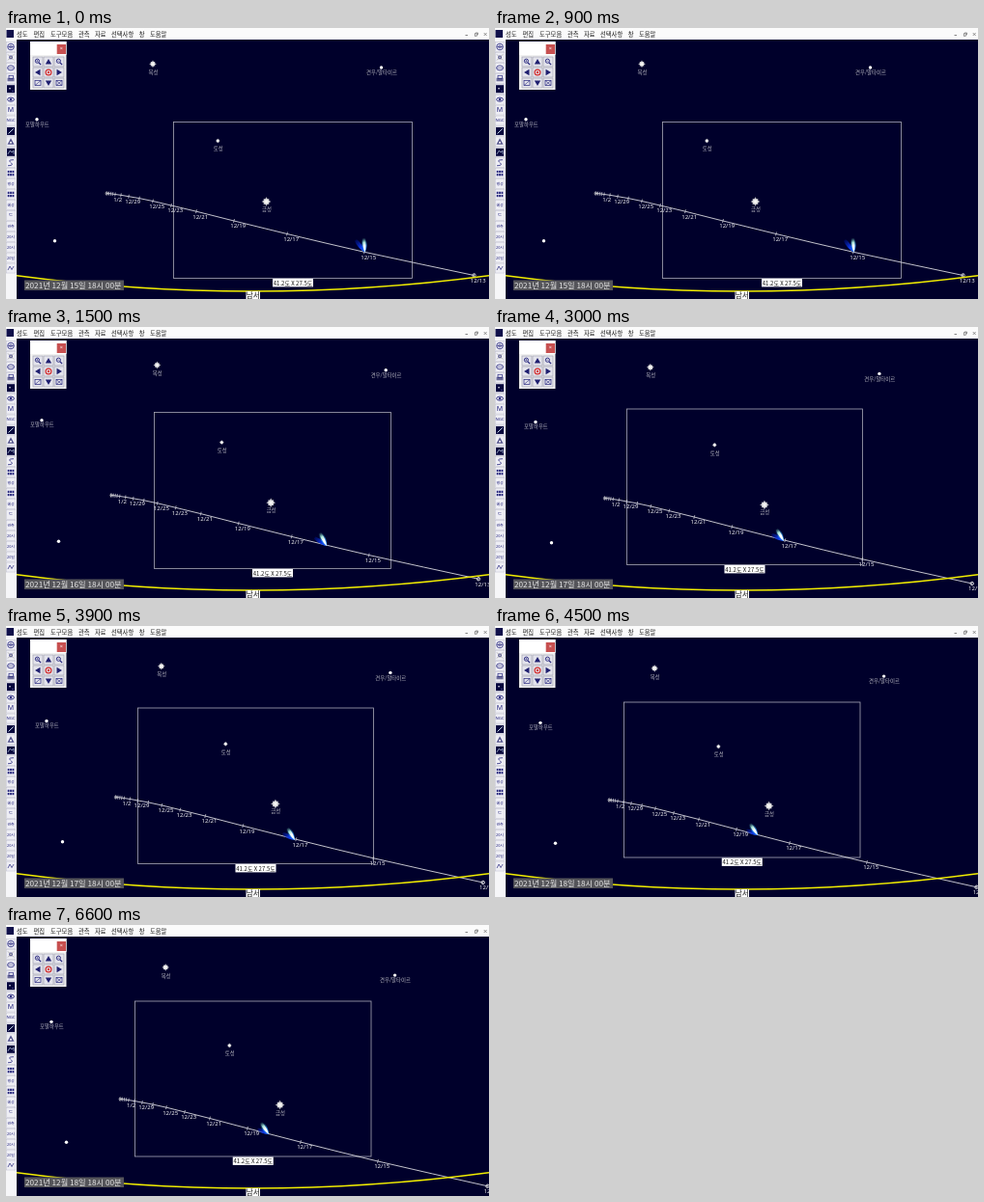
Write an HTML page with a canvas that moves like this. It is 500 by 281 pixels and loops after 8 s.

```html
<!DOCTYPE html>
<html lang="ko">
<head>
<meta charset="utf-8">
<title>Comet path</title>
<style>
html, body { margin: 0; width: 100%; height: 100%; overflow: hidden; background: #00002b; }
canvas { display: block; width: 500px; height: 281px; }
</style>
</head>
<body>
<canvas id="sky"></canvas>
<script>
const W = 500, H = 281, LOOP = 8000;
const cv = document.getElementById('sky');
const c = cv.getContext('2d');
const dpr = window.devicePixelRatio || 1;
cv.width = W * dpr;
cv.height = H * dpr;
c.scale(dpr, dpr);

const KR = '"Noto Sans CJK KR", "Noto Sans CJK", sans-serif';
const LATIN = '"Noto Sans", sans-serif';
const INK = '#24247c';

// One entry per day: frame corner, comet head, its two tail ends
const days = [
  { box: [173, 97, 247, 162], head: [371.5, 232.5], dust: [370.5, 218], ion: [362, 220] },
  { box: [153, 88, 245, 162], head: [332, 227], dust: [325, 213.5], ion: [319.5, 218.5] },
  { box: [136, 84.5, 244, 161.5], head: [299, 222], dust: [291.5, 209.5], ion: [286.5, 215] },
  { box: [133, 78.5, 244.5, 161], head: [272, 217], dust: [264, 205], ion: [260.5, 211.5] }
];

// Name, position on the first day, step per day, size, label drop
const stars = [
  { name: '목성', x: 152, y: 37.3, dx: 4.4, dy: 2.2, r: 4, drop: 8.6 },
  { name: '토성', x: 219.3, y: 117, dx: 4, dy: 2.65, r: 2.6, drop: 8.4 },
  { name: '금성', x: 269.5, y: 180, dx: 4.7, dy: 2.2, r: 5, drop: 8 },
  { name: '견우/알타이르', x: 388.5, y: 41, dx: 4.7, dy: 3.7, drop: 5.2 },
  { name: '포말하우트', x: 32, y: 94.8, dx: 5, dy: 1.85, drop: 4.7 },
  { name: '', x: 50.5, y: 220.7, dx: 4, dy: 1.5 }
];

const path = [
  [104, 171.5], [106.5, 171.6], [108.5, 171.8], [110.5, 172.1],
  [113, 172.5, '1/2'], [119, 173.3], [127, 174.7, '12/29'], [138, 176.6],
  [152, 179.5, '12/25'], [171, 184, '12/23'], [197, 190.2, '12/21'],
  [236, 200, '12/19'], [291, 213.5, '12/17'], [371, 232.3, '12/15'],
  [484.5, 256.5, '12/13']
];

function rect(x, y, w, h, fill) {
  c.fillStyle = fill;
  c.fillRect(x, y, w, h);
}

function frame(x, y, w, h, color, lw = 0.7) {
  c.strokeStyle = color;
  c.lineWidth = lw;
  c.strokeRect(x, y, w, h);
}

function text(s, x, y, size, color, font = KR, align = 'center') {
  c.font = size + 'px ' + font;
  c.textAlign = align;
  c.textBaseline = 'middle';
  c.fillStyle = color;
  c.fillText(s, x, y);
}

function dot(x, y, r, color) {
  c.fillStyle = color;
  c.beginPath();
  c.arc(x, y, r, 0, 7);
  c.fill();
}

function ring(x, y, r, color, lw = 0.8, squash = 1) {
  c.strokeStyle = color;
  c.lineWidth = lw;
  c.beginPath();
  c.ellipse(x, y, r, r * squash, 0, 0, 7);
  c.stroke();
}

function line(pts, color, lw = 0.8) {
  c.strokeStyle = color;
  c.lineWidth = lw;
  c.beginPath();
  pts.forEach(([x, y]) => c.lineTo(x, y));
  c.stroke();
}

function poly(pts, fill) {
  c.fillStyle = fill;
  c.beginPath();
  pts.forEach(([x, y]) => c.lineTo(x, y));
  c.fill();
}

function planet(x, y, r) {
  const g = c.createRadialGradient(x, y, 0, x, y, r);
  g.addColorStop(0, '#fff');
  g.addColorStop(0.45, '#e4e4e4');
  g.addColorStop(1, '#777788');
  c.fillStyle = g;
  c.beginPath();
  for (let i = 0; i < 16; i++) {
    const a = i * Math.PI / 8;
    const k = r * (i % 4 === 0 ? 1 : i % 2 === 0 ? 0.82 : 0.6);
    c.lineTo(x + k * Math.cos(a), y + k * Math.sin(a));
  }
  c.fill();
}

function drawStars(day) {
  for (const s of stars) {
    const x = s.x + s.dx * day, y = s.y + s.dy * day;
    if (s.r) planet(x, y, s.r);
    else dot(x, y, 1.7, '#fff');
    if (s.name) text(s.name, x + 0.4, y + s.drop, 5.4, '#b4b4be');
  }
}

function drawPath(day) {
  const pts = path.map(([x, y, label]) =>
    [x + 4.65 * day, y + day * (3 + (x - 104) / 380 * 1.75), label]);
  const at = i => pts[Math.max(0, Math.min(pts.length - 1, i))];
  c.strokeStyle = '#d8d8de';
  c.lineWidth = 0.9;
  c.beginPath();
  c.moveTo(pts[0][0], pts[0][1]);
  for (let i = 0; i < pts.length - 1; i++) {
    const [p, a, b, n] = [at(i - 1), at(i), at(i + 1), at(i + 2)];
    const k = (b[0] - a[0]) / 3;
    const m = (q, r) => (r[1] - q[1]) / (r[0] - q[0]);
    c.bezierCurveTo(a[0] + k, a[1] + k * m(p, b), b[0] - k, b[1] - k * m(a, n), b[0], b[1]);
  }
  c.stroke();
  pts.forEach(([x, y, label], i) => {
    const p = at(i - 1), n = at(i + 1);
    const a = Math.atan2(n[1] - p[1], n[0] - p[0]) + Math.PI / 2;
    const u = 2 * Math.cos(a), v = 2 * Math.sin(a);
    line([[x - u, y - v], [x + u, y + v]], '#d8d8de', 0.7);
    if (label) text(label, x + (label === '1/2' ? 2.7 : 4.2), y + 5.7, 6, '#f0f0f0', LATIN);
  });
  ring(pts[0][0] + 0.5, pts[0][1], 1.4, '#ccc', 0.7);
  const end = at(pts.length - 1);
  ring(end[0], end[1], 1.7, '#ddd', 0.9);
}

function tail(head, tip, w, stops) {
  const dx = tip[0] - head[0], dy = tip[1] - head[1], n = Math.hypot(dx, dy);
  const g = c.createLinearGradient(head[0], head[1], tip[0], tip[1]);
  stops.forEach(([at, color]) => g.addColorStop(at, color));
  c.save();
  c.translate(head[0], head[1]);
  c.transform(dx / n, dy / n, -dy / n, dx / n, 0, 0);
  c.beginPath();
  c.moveTo(0, 0);
  c.bezierCurveTo(n * 0.3, -w, n * 0.8, -w, n, -w * 0.5);
  c.lineTo(n, w * 0.5);
  c.bezierCurveTo(n * 0.8, w, n * 0.3, w, 0, 0);
  c.restore();
  c.fillStyle = g;
  c.fill();
}

function drawComet(d) {
  tail(d.head, d.ion, 2.4, [[0, '#2a6cff'], [0.45, '#0a35e0'], [1, 'rgba(0,20,150,.35)']]);
  tail(d.head, d.dust, 3.2, [[0, '#2c86ff'], [0.5, 'rgba(40,140,230,.8)'], [1, 'rgba(20,70,90,.1)']]);
  tail(d.head, d.dust, 1.9, [[0, '#eaffff'], [0.45, '#ffffff'], [0.7, '#a8e4d8'], [1, 'rgba(90,150,130,.1)']]);
}

function drawBox([x, y, w, h]) {
  frame(x + 0.5, y + 0.5, w, h, '#a9a9b6', 0.8);
  const mx = x + w / 2 + 0.5, ty = y + h + 1;
  rect(mx - 21, ty, 42, 8.4, '#fff');
  text('41.2도 X 27.5도', mx, ty + 4.4, 6, '#111');
}

function drawHorizon(day) {
  c.strokeStyle = '#f2ee00';
  c.lineWidth = 1.5;
  c.beginPath();
  c.moveTo(11, 256.8);
  c.quadraticCurveTo(255.5, 289.2, 500, 256.8);
  c.stroke();
  rect(248.5, 273, 14.5, 8, '#fff');
  text('남서', 255.7, 277.2, 7.6, '#111');
  rect(19, 261.5, 103, 10.5, '#55555a');
  text(`2021년 12월 ${15 + day}일 18시 00분`, 20, 267, 8.2, '#e8e8e8', KR, 'left');
}

function drawMenu() {
  rect(0, 0, W, 12, '#fbfbfb');
  rect(0.5, 2, 7.5, 8, '#10104a');
  const items = [['성도', 11], ['편집', 28.5], ['도구모음', 46], ['관측', 75],
    ['자료', 92], ['선택사항', 109], ['창', 137.7], ['도움말', 149]];
  items.forEach(([s, x]) => text(s, x, 6.2, 6.3, '#1c1c1c', KR, 'left'));
  line([[475.5, 7.5], [478, 7.5]], '#555', 0.7);
  frame(485.3, 5.8, 2.4, 2.4, '#555', 0.6);
  line([[486.2, 5], [488.5, 5], [488.5, 7.2]], '#555', 0.6);
  line([[494.7, 5], [497.7, 8]], '#555', 0.6);
  line([[497.7, 5], [494.7, 8]], '#555', 0.6);
}

function grid(x, y) {
  for (let j = 0; j < 2; j++) {
    for (let i = 0; i < 3; i++) rect(x - 3.3 + i * 2.4, y - 2.8 + j * 3.2, 1.8, 2.3, INK);
  }
}

const word = s => (x, y) => text(s, x, y, 3.9, INK);
function darkIcon(x, y) {
  rect(x - 4, y - 4, 8, 8, '#05053c');
}

const icons = [
  (x, y) => { ring(x, y, 3.3, INK); ring(x, y, 1.4, INK, 0.6); line([[x - 3, y], [x + 3, y]], INK, 0.6); },
  (x, y) => { ring(x, y, 1.5, INK); line([[x - 3, y - 3], [x + 3, y + 3]], '#777', 0.6); line([[x - 3, y + 3], [x + 3, y - 3]], '#777', 0.6); },
  (x, y) => { ring(x, y, 3.5, INK, 0.8, 0.7); line([[x - 3, y], [x + 3, y]], INK, 0.5); },
  (x, y) => { rect(x - 3.5, y - 0.5, 7, 3.5, '#6b6b99'); frame(x - 2, y - 3, 4.5, 3, INK); },
  (x, y) => { darkIcon(x, y); dot(x - 1, y - 0.5, 0.8, '#fff'); dot(x + 2, y + 2, 0.5, '#aaf'); },
  (x, y) => { ring(x, y, 3.4, INK, 0.9, 0.6); dot(x, y, 1.2, INK); },
  (x, y) => text('M', x, y + 0.2, 7, INK, 'bold ' && LATIN),
  (x, y) => text('NGC', x, y + 0.2, 4.3, INK, LATIN),
  (x, y) => { darkIcon(x, y); line([[x - 2.5, y + 2.5], [x + 2.8, y - 2.5]], '#cde', 1); },
  (x, y) => { poly([[x - 3.5, y + 3], [x, y - 3.5], [x + 3.5, y + 3]], '#54548c'); dot(x, y + 0.8, 1, '#fff'); },
  (x, y) => { darkIcon(x, y); line([[x - 3, y + 2], [x - 1, y - 1.5], [x + 1, y], [x + 3, y - 1.5], [x + 3, y + 2]], '#cde', 0.7); },
  (x, y) => {
    c.strokeStyle = INK;
    c.lineWidth = 0.8;
    c.beginPath();
    c.moveTo(x + 3, y - 3);
    c.bezierCurveTo(x - 9, y - 3, x + 9, y + 2.5, x - 3, y + 3);
    c.stroke();
  },
  grid, word('행성'), grid, word('혜성'),
  (x, y) => text('ᄃ', x, y, 5, INK),
  word('관측'), word('20시'), word('20시'), word('20일'),
  (x, y) => line([[x - 3, y + 2], [x - 1, y - 2], [x + 1, y + 1.5], [x + 3, y - 2]], INK, 0.7)
];

function drawToolbar() {
  rect(0, 12, 11, H - 12, '#f6f6f8');
  icons.forEach((icon, i) => {
    const y = 19.5 + i * 10.93;
    rect(0.5, y - 5, 9.5, 10, '#eeeef4');
    frame(0.5, y - 5, 9.5, 10, '#bcbccb', 0.5);
    icon(5, y);
  });
}

function lens(x, y, plus) {
  ring(x - 0.6, y - 0.8, 2.1, INK, 0.9);
  line([[x + 0.9, y + 0.8], [x + 3.1, y + 3]], INK, 1.2);
  line([[x - 1.8, y - 0.8], [x + 0.6, y - 0.8]], INK, 0.5);
  if (plus) line([[x - 0.6, y - 2], [x - 0.6, y + 0.4]], INK, 0.5);
}

function arrow(x, y, dx, dy) {
  poly([[x + dx * 3, y + dy * 3], [x - dx * 2.5 + dy * 3.2, y - dy * 2.5 + dx * 3.2],
    [x - dx * 2.5 - dy * 3.2, y - dy * 2.5 - dx * 3.2]], '#202070');
}

function drawPanel() {
  rect(25, 14, 37.5, 50, '#f0f0f0');
  rect(25, 14, 37.5, 14, '#fff');
  rect(52.7, 17, 9.3, 10, '#c75050');
  text('×', 57.4, 21.8, 5.5, '#fff', LATIN);
  for (let j = 0; j < 3; j++) {
    for (let i = 0; i < 3; i++) {
      const x = 33 + i * 11, y = 35 + j * 11;
      rect(x - 5, y - 5, 10, 10, '#e4e4ec');
      frame(x - 5, y - 5, 10, 10, '#9c9cab', 0.6);
      if (i === 1 && j === 1) {
        ring(x, y, 2.9, '#d22d2d', 1.2);
        dot(x, y, 1.2, '#d22d2d');
      } else if (i === 1 || j === 1) {
        arrow(x, y, i - 1, j - 1);
      } else if (j === 0) {
        lens(x, y, i === 0);
      } else {
        frame(x - 3, y - 2.5, 6, 5, INK, 0.7);
        line([[x - 3, y + 2.5], [x + 3, y - 2.5]], INK, 0.6);
        if (i) line([[x - 3, y - 2.5], [x + 3, y + 2.5]], INK, 0.6);
      }
    }
  }
}

function draw(now) {
  const day = Math.min(3, Math.floor((now % LOOP) / 1500));
  rect(0, 0, W, H, '#00002b');
  drawBox(days[day].box);
  drawStars(day);
  drawPath(day);
  drawComet(days[day]);
  drawHorizon(day);
  drawMenu();
  drawToolbar();
  drawPanel();
}

const start = performance.now();
function tick() {
  draw(performance.now() - start);
  requestAnimationFrame(tick);
}
tick();
</script>
</body>
</html>
```
